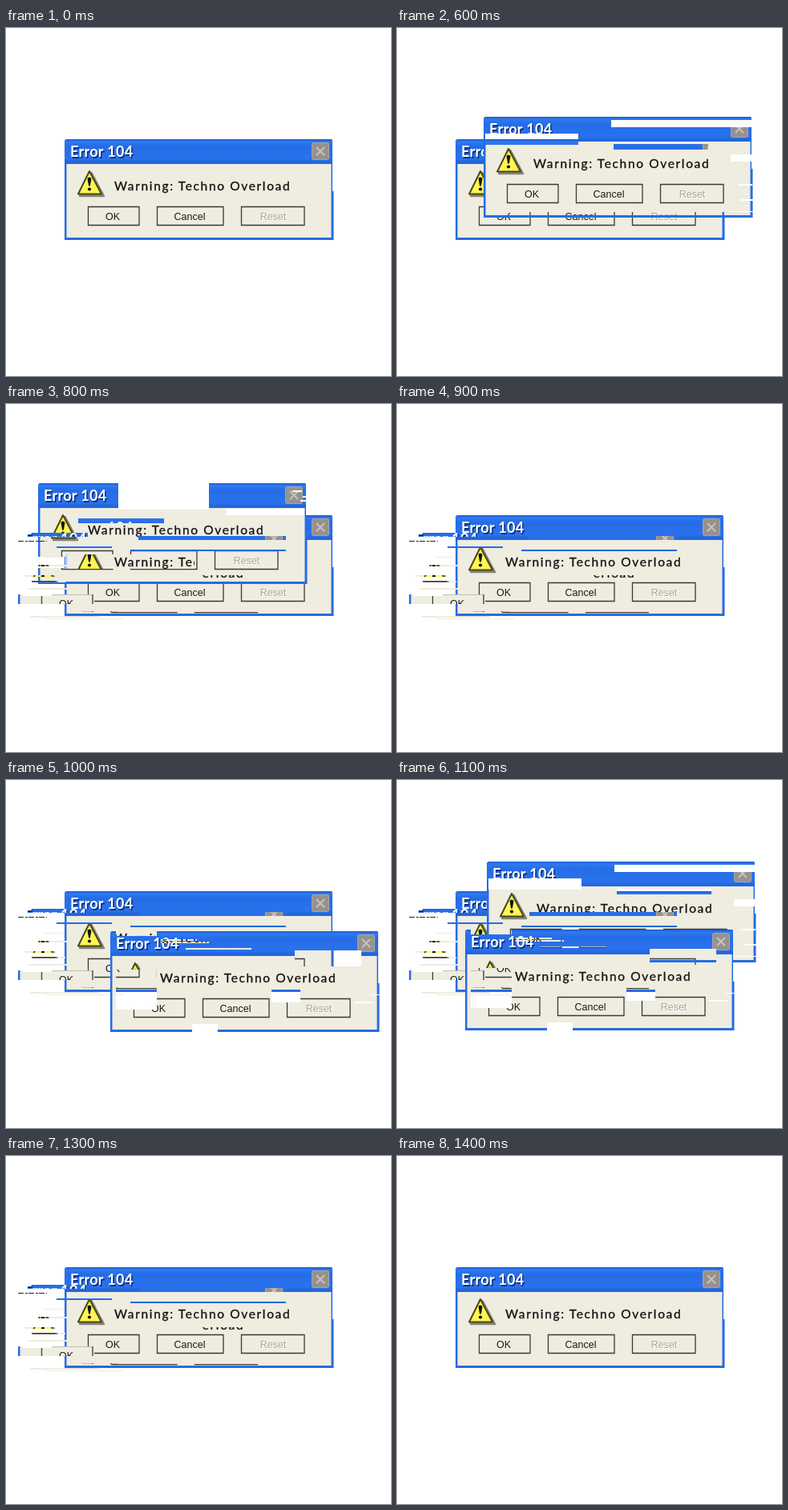
Recreate the animation shown at these times as an HTML page. Size 480 by 435 pixels, loop 1.5 s.

```html
<!DOCTYPE html>
<html lang="en">
<head>
<meta charset="utf-8">
<title>Error 104</title>
<style>
  html, body { margin: 0; width: 100%; height: 100%; overflow: hidden; background: #fff; }
  svg { display: block; width: 480px; height: 435px; }
  mask { mask-type: luminance; }
  .title { font: 700 18px Lato, sans-serif; letter-spacing: .3px; }
  .msg { font: 400 15.5px Lato, sans-serif; letter-spacing: 1.65px; fill: #111; stroke: #111; stroke-width: .3px; }
  .label { font: 12.5px "Liberation Sans", Arial, sans-serif; text-anchor: middle; }

  .glitch { visibility: hidden; animation: 1.5s step-end infinite; }
  #upper { animation-name: upper; }
  #left { animation-name: left; }
  #ghost { animation-name: ghost; }
  #lower { animation-name: lower; }

  @keyframes upper {
    0%, 46.66%, 79.99% { visibility: hidden; transform: none; }
    40% { visibility: visible; transform: none; }
    73.33% { visibility: visible; transform: translate(4px, -9px); }
  }
  @keyframes left {
    0%, 60%, 86.66% { visibility: hidden; transform: none; }
    53.33% { visibility: visible; transform: none; }
    79.99% { visibility: visible; transform: translate(-9px, -14px); }
  }
  @keyframes ghost {
    0%, 93.33% { visibility: hidden; }
    46.66% { visibility: visible; }
  }
  @keyframes lower {
    0%, 79.99% { visibility: hidden; transform: none; }
    66.66% { visibility: visible; transform: none; }
    73.33% { visibility: visible; transform: translate(-45px, -2px); }
  }
</style>
</head>
<body>
<svg viewBox="0 0 480 435">
  <defs>
    <linearGradient id="bar" x2="0" y2="1">
      <stop offset="0" stop-color="#1d58cf"/>
      <stop offset=".1" stop-color="#2f7af0"/>
      <stop offset=".3" stop-color="#266ce6"/>
      <stop offset=".8" stop-color="#2a72ee"/>
      <stop offset="1" stop-color="#2163d8"/>
    </linearGradient>

    <g id="button">
      <path d="M.5 .5H63.500V23.500H.5z" fill="none" stroke="#3b3a36"/>
    </g>

    <g id="dialog">
      <path d="M73 141l2-2H406l1 2V204h1.500V265H73z" fill="#266ce6"/>
      <path d="M73 141l2-2H406l1 2V169H73z" fill="url(#bar)"/>
      <path d="M75.500 170H405.500V262H75.500z" fill="#efece0"/>
      <text class="title" x="81.500" y="162.500" fill="#12317c">Error 104</text>
      <text class="title" x="80" y="161" fill="#fff">Error 104</text>

      <rect x="381.500" y="143.500" width="21" height="21" rx="2" fill="#96928f" stroke="#aaa6a2"/>
      <path d="M387 149l10 10m0-10l-10 10" stroke="#c8c3bd" stroke-width="2"/>

      <path d="M106.500 181L92 210H122z" fill="#85837b" stroke="#85837b" stroke-width="2.500" stroke-linejoin="round"/>
      <path d="M104 179L90 207.500H119z" fill="#fff652" stroke="#4a4818" stroke-width="2" stroke-linejoin="round"/>
      <path d="M101.500 188q2.500-3 5 0l-1.600 9.500h-1.800z" fill="#111"/>
      <circle cx="104" cy="201.500" r="2.100" fill="#111"/>

      <text class="msg" x="135" y="202.500">Warning: Techno Overload</text>

      <path d="M102.500 223.500H166V246.500H102.500zM188.500 223.500H271V246.500H188.500zM293.500 223.500H372V246.500H293.500z" fill="none" stroke="#3b3a36" stroke-width="1.300"/>
      <g class="label">
        <text x="133" y="239.700" fill="#1a1a1a">OK</text>
        <text x="229" y="239.700" fill="#1a1a1a">Cancel</text>
        <text x="334" y="240.700" fill="#fff">Reset</text>
        <text x="333" y="239.700" fill="#aaa79d">Reset</text>
      </g>
    </g>

    <!-- Black parts are torn out of a window, so what lies beneath shows. -->
    <rect id="page" width="480" height="435" fill="#fff"/>
    <mask id="upperMask" maskUnits="userSpaceOnUse" x="0" y="0" width="480" height="435">
      <use href="#page"/>
      <path d="M267 115h177v9h-177zM110 132h116v14h-116zM270 145h118v7h-118zM416 158h28v9h-28zM138 230h270v4h-270z"/>
    </mask>
    <mask id="leftMask" maskUnits="userSpaceOnUse" x="0" y="0" width="480" height="435">
      <use href="#page"/>
      <path d="M140 98h113v34h-113zM274 131h98v8h-98zM90 143h107v6h-107zM40 191h34v14h-34zM75 188h160v18h-160z"/>
    </mask>
    <mask id="lowerMask" maskUnits="userSpaceOnUse" x="0" y="0" width="480" height="435">
      <use href="#page"/>
      <path d="M137 187h51v8h-51zM360 213h83v20h-83zM137 237h51v50h-51zM331 262h36v16h-36zM232 305h32v11h-32z"/>
    </mask>

    <!-- Strips kept from the faint copy. -->
    <clipPath id="ghostClip">
      <path d="M27 161h75v5h-75zM165 165h185v5h-185zM155 182h195v2h-195zM63 178h69v2h-69zM15 238h95v12h-95zM131 260h183v2h-183zM243 214h53v3h-53z"/>
    </clipPath>
  </defs>

  <use href="#dialog"/>
  <g class="glitch" id="upper"><g mask="url(#upperMask)"><use href="#dialog" x="35" y="-28"/></g></g>
  <g class="glitch" id="left"><g mask="url(#leftMask)"><use href="#dialog" x="-33" y="-40"/></g></g>
  <g class="glitch" id="ghost">
    <g clip-path="url(#ghostClip)"><use href="#dialog" x="-58" y="14"/></g>
    <path d="M15 171.500H51" stroke="#222" stroke-dasharray="7 2 3 1"/>
  </g>
  <g class="glitch" id="lower"><g mask="url(#lowerMask)"><use href="#dialog" x="57" y="50"/></g></g>
</svg>

<script>
  const random = seed => () => (seed = seed * 16807 % 2147483647) / 2147483647;

  // Scatter thin strips over an area, one per equal band of its height.
  function scatter(id, seed, count, x, y, w, h) {
    const next = random(seed);
    for (let i = 0; i < count; i++) {
      const strip = document.createElementNS('http://www.w3.org/2000/svg', 'rect');
      const width = w * (.3 + .4 * next());
      strip.setAttribute('x', Math.round(x + (w - width) * next()));
      strip.setAttribute('y', Math.round(y + h * (i + next()) / count));
      strip.setAttribute('width', Math.round(width));
      strip.setAttribute('height', 1 + Math.round(next()));
      document.getElementById(id).append(strip);
    }
  }

  scatter('upperMask', 41, 3, 408, 175, 60, 60);
  scatter('leftMask', 17, 3, 350, 102, 40, 22);
  scatter('lowerMask', 23, 3, 190, 197, 150, 14);
  scatter('lowerMask', 29, 2, 425, 250, 50, 40);
  scatter('ghostClip', 73, 6, 15, 190, 75, 48);
  scatter('ghostClip', 97, 3, 15, 258, 150, 14);
</script>
</body>
</html>
```
